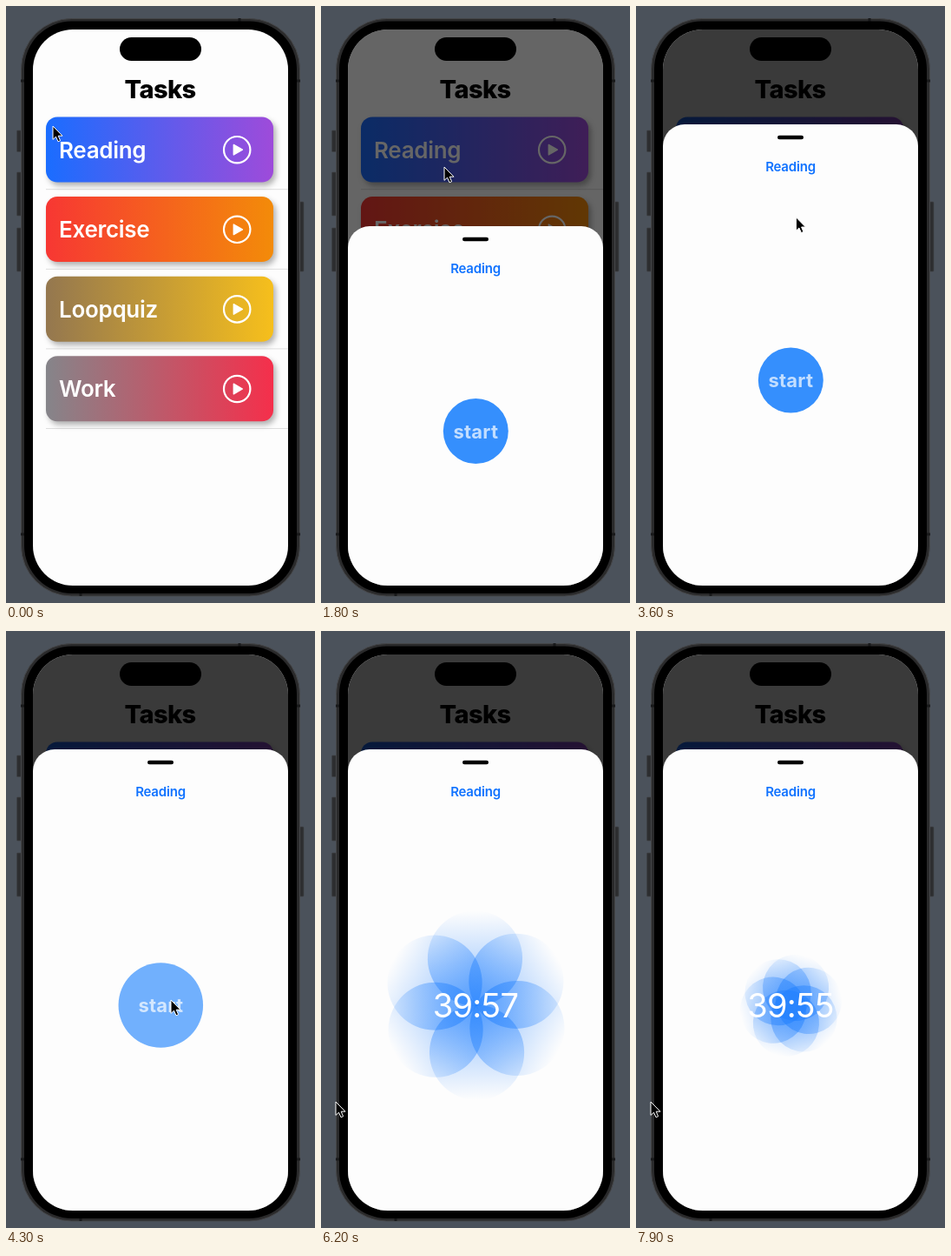
Recreate the animation shown at these times as an HTML page. Size 356 by 686 pixels, loop 8000 ms.

```html
<!DOCTYPE html>
<html lang="en">
<head>
<meta charset="utf-8">
<title>Tasks</title>
<style>
  html, body { margin: 0; width: 100%; height: 100%; overflow: hidden; background: #4b525b; }
  svg { display: block; width: 356px; height: 686px; }
  text { font-family: Inter, "Liberation Sans", sans-serif; }
  .mid { text-anchor: middle; }
  .card { filter: drop-shadow(3px 4px 3px rgba(0, 0, 0, .3)); }
</style>
</head>
<body>
<svg viewBox="0 0 356 686">
  <defs>
    <clipPath id="screen"><rect x="31" y="27" width="294" height="639" rx="46"/></clipPath>
    <linearGradient id="petalFill" x1="0" y1="1" x2="0" y2="0">
      <stop offset="0" stop-color="#1f7fff" stop-opacity=".52"/>
      <stop offset="1" stop-color="#1f7fff" stop-opacity="0"/>
    </linearGradient>
  </defs>
  <rect width="356" height="686" fill="#4b525b"/>
  <g fill="#2d2e30" stroke="#404246" stroke-width=".7">
    <rect x="12.5" y="143" width="6" height="24.5" rx="1"/>
    <rect x="12.5" y="191" width="6" height="50" rx="1"/>
    <rect x="12.5" y="255" width="6" height="50" rx="1"/>
    <rect x="337" y="225" width="6" height="80" rx="1"/>
  </g>
  <rect x="17.5" y="14.5" width="321" height="663.5" rx="58" fill="#2a2a2b" stroke="#454648"/>
  <path d="M269 14v4M86 674v4M17 86h4M335 86h4M17 607h4M335 607h4" stroke="#18191a" stroke-width="3"/>
  <rect x="21" y="17.5" width="314" height="657.5" rx="55" fill="#000"/>
  <g clip-path="url(#screen)">
    <rect x="31" y="27" width="294" height="639" fill="#fdfdfd"/>
    <text class="mid" x="177.6" y="106" font-size="29" font-weight="800" letter-spacing="-.6">Tasks</text>
    <g id="cards"></g>
    <rect id="dim" x="31" y="27" width="294" height="639" opacity="0"/>
    <rect x="131" y="36" width="94" height="27" rx="13.5"/>
    <g id="sheet">
      <rect x="31" width="294" height="700" rx="25" fill="#fdfdfd"/>
      <rect x="163" y="12.7" width="30" height="4.6" rx="2.3"/>
      <text class="mid" x="178" y="54" font-size="15" font-weight="600" letter-spacing="-.2" fill="#0f72ff">Reading</text>
    </g>
    <g id="button">
      <circle id="disc" fill="#358ffd"/>
      <text class="mid" y="8" font-size="22" font-weight="700" letter-spacing=".2" fill="#fff" fill-opacity=".7">start</text>
    </g>
    <g id="flower" transform="translate(178.5 430.3)">
      <g id="petals"></g>
      <text id="timer" class="mid" x="-.5" y="13.8" font-size="38" letter-spacing="-.7" fill="#fff"></text>
    </g>
  </g>
  <path id="cursor" d="M0 0V15.4L3.5 12.2 6 17.8 8.6 16.7 6.2 11.2H11Z" stroke="#fff" stroke-linejoin="round"/>
</svg>
<script>
const LOOP = 8000, STEP = 100, PETALS = 6;
const CLOSED = 666, HALF = 253, FULL = 136;
const $ = id => document.getElementById(id);
const clamp = v => Math.max(0, Math.min(1, v));
const mix = (a, b, p) => a + (b - a) * p;
const ease = v => (1 - Math.cos(Math.PI * clamp(v))) / 2;

const tasks = [
  ["Reading", "#1a6dff", "#9e4bda"],
  ["Exercise", "#f73733", "#f38b09"],
  ["Loopquiz", "#94774f", "#f6bf1c"],
  ["Work", "#85858a", "#f52f4b"]
];
$("cards").innerHTML = tasks.map(([name, from, to], i) => `
  <linearGradient id="tint${i}"><stop stop-color="${from}"/><stop offset="1" stop-color="${to}"/></linearGradient>
  <g transform="translate(46 ${127.5 + i * 91.6})">
    <path d="M0 83.2H279" stroke="#dedede"/>
    <rect class="card" width="262" height="75" rx="13" fill="url(#tint${i})"/>
    <text x="15" y="47" font-size="26" font-weight="600" letter-spacing="-.3" fill="#fff">${name}</text>
    <circle cx="220.2" cy="37.7" r="15.2" fill="none" stroke="#fff" stroke-width="2.2"/>
    <path d="M216.3 31.9L226.4 37.7 216.3 43.5Z" fill="#fff" stroke="#fff" stroke-width="1.4" stroke-linejoin="round"/>
  </g>`).join("");
$("petals").innerHTML = '<circle fill="url(#petalFill)"/>'.repeat(PETALS);
const petals = [...$("petals").children];

// Pointer path: time, x, y
const path = [
  [0, 54, 138], [800, 116, 166], [900, 116, 167], [1400, 138, 182], [1800, 142, 185],
  [2150, 178, 262], [2300, 178, 262], [2550, 180, 78], [2700, 180, 133], [3500, 184, 230],
  [4100, 190, 421], [4300, 190, 424], [4500, 190, 424], [5200, 17, 541]
];
function pointer(t) {
  const i = path.findIndex(k => k[0] > t);
  if (i < 0) return path[path.length - 1].slice(1);
  const [t0, x0, y0] = path[i - 1], [t1, x1, y1] = path[i];
  const p = ease((t - t0) / (t1 - t0));
  return [mix(x0, x1, p), mix(y0, y1, p)];
}

function sheetTop(t) {
  if (t < 840) return CLOSED + 40;
  if (t < 1400) {
    const w = (t - 840) * .012;
    return mix(CLOSED, HALF, 1 - (1 + w) * Math.exp(-w));
  }
  if (t < 2500) return HALF;
  if (t < 2700) return mix(HALF, 158.5, (t - 2500) / 200);
  if (t < 3500) return FULL + 22.5 * Math.exp((2700 - t) / 200);
  return FULL;
}

// Stepped time, with the pauses where the picture stands still
function stepped(ms) {
  const t = Math.floor(ms % LOOP / STEP) * STEP;
  if (t > 1400 && t < 1800) return 1400;
  if (t === 5300) return 5200;
  if (t > 5400 && t < 5800) return 5400;
  return t;
}

function drawButton(t, top) {
  const p = ease((t - 3820) / 1300);
  const y = top > HALF ? top + 235.5 : 362 + top / 2;
  $("button").setAttribute("transform", `translate(178.3 ${y})`);
  $("button").setAttribute("opacity", 1 - p);
  $("disc").setAttribute("r", 37.5 * (1 + p));
}

function drawFlower(t) {
  const open = t < 6000 ? ease((t - 5000) / 1000) : 1 - ease((t - 6000) / 2000);
  const r = mix(38, 55, open), d = mix(21, 55, open), turn = -45 * (1 - open);
  $("flower").setAttribute("opacity", clamp((t - 4600) / 600));
  petals.forEach((petal, i) => {
    petal.setAttribute("r", r);
    petal.setAttribute("transform", `rotate(${turn + i * 360 / PETALS}) translate(0 ${-d})`);
  });
  $("timer").textContent = "39:" + (59 - Math.max(0, Math.floor((t - 3800) / 1000)));
}

function draw(t) {
  const top = sheetTop(t);
  const shadeTop = t < 2700 ? Math.max(top, HALF) : top;
  const height = CLOSED - shadeTop;
  $("dim").setAttribute("opacity", height > 0 ? .01 + height * .00143 : 0);
  $("sheet").setAttribute("transform", `translate(0 ${top})`);
  drawButton(t, top);
  drawFlower(t);
  $("cursor").setAttribute("transform", `translate(${pointer(t).join(" ")})`);
}

const start = performance.now();
function tick() {
  draw(stepped(performance.now() - start));
  requestAnimationFrame(tick);
}
tick();
</script>
</body>
</html>
```
